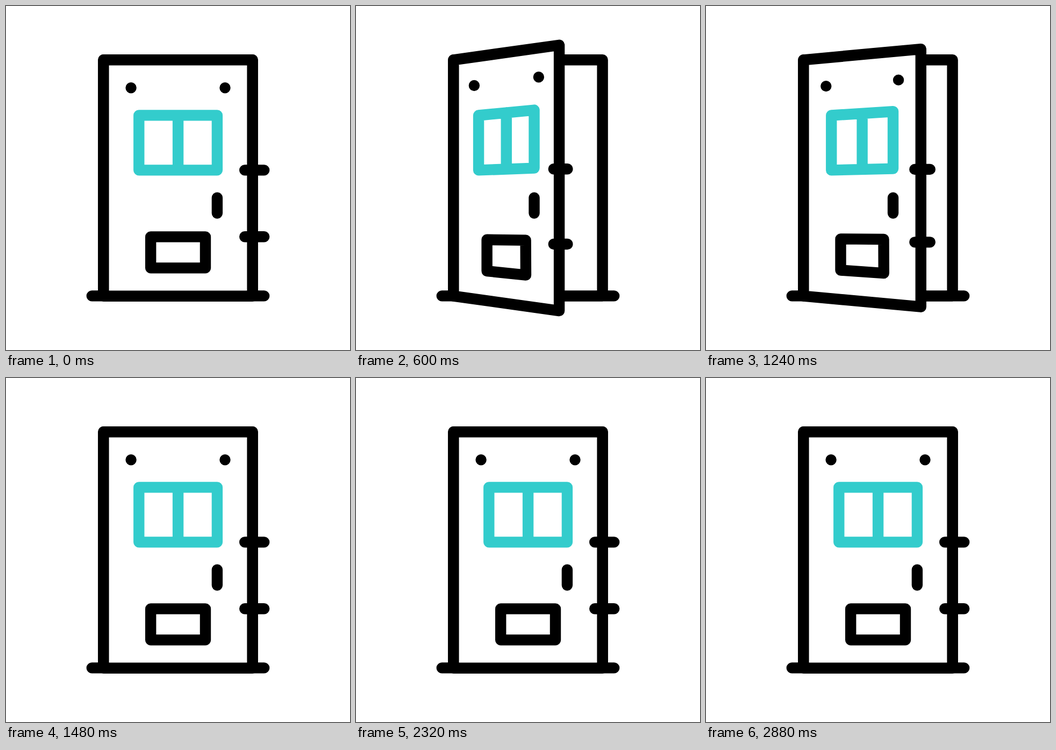
An HTML page that plays this animation: 640x640 px, repeating every 3 s.

```html
<!DOCTYPE html>
<html lang="en">
<head>
<meta charset="utf-8">
<title>Swinging door</title>
<style>
  html, body { margin: 0; width: 100%; height: 100%; overflow: hidden; background: #fff; }
  svg { display: block; width: 100%; height: 100%; }
  path { fill: none; stroke: #000; stroke-width: 20.4; stroke-linecap: round; stroke-linejoin: round; }
  .leaf { fill: #fff; }
  .glass { stroke: #33cccc; }
</style>
</head>
<body>
<svg viewBox="0 0 640 640">
  <path d="M181.4 100.3H458.6V539.6H181.4ZM159.8 539.4H480.2"/>

  <!-- d is the closed pose, data-open the open one -->
  <path class="leaf" d="M181.4 100.3L458.6 100.3L458.6 539.6L181.4 539.6Z"
    data-open="M181.4 100.3L366 68.6L366 571.2L181.4 539.6Z"/>
  <path d="M232.6 152.3L232.6 152.3M407.5 152.3L407.5 152.3"
    data-open="M218 147.3L218 147.3M329.7 129.2L329.7 129.2"/>
  <path class="glass" d="M247.3 203.4L392.9 203.4L392.9 305.4L247.3 305.4ZM320.1 203.4L320.1 305.4"
    data-open="M225.2 203.5L322.3 192.1L322.3 301L225.2 305.4ZM273.7 197.8L273.7 303.2"/>
  <path d="M392.9 356.6L392.9 385.5" data-open="M322.3 356.6L322.3 385.5"/>
  <path d="M269.2 429.4L371 429.4L371 487.4L269.2 487.4Z"
    data-open="M239.8 435.6L307.3 436.7L307.7 502.6L239.8 493.9Z"/>
  <path d="M444.2 305.4L480.2 305.4M444.2 429.3L480.2 429.3"
    data-open="M356.3 303L380.4 303M356.3 445.1L380.4 445.1"/>
</svg>
<script>
const LOOP = 3000, STEP = 40;
const OPEN_AT = 80, PEAK_AT = 850, SHUT_AT = 1480, PEAK = 1.03;
// rebounds: start, end, height
const REBOUNDS = [[SHUT_AT, 2320, 0.397], [2320, 2880, 0.085]];

const NUM = /-?\d+(\.\d+)?/g;
const parts = [...document.querySelectorAll('[data-open]')].map(el => ({
  el,
  shape: el.getAttribute('d'),
  open: el.dataset.open.match(NUM).map(Number)
}));

// cubic-bezier(.6, 0, .4, 1)
function easeInOut(x) {
  let lo = 0, hi = 1, s;
  for (let i = 0; i < 24; i++) {
    s = (lo + hi) / 2;
    const bx = 1.8 * s * (1 - s) ** 2 + 1.2 * s * s * (1 - s) + s ** 3;
    if (bx < x) lo = s; else hi = s;
  }
  return s * s * (3 - 2 * s);
}

function swing(t) {
  if (t <= OPEN_AT) return 0;
  if (t < PEAK_AT) return PEAK * easeInOut((t - OPEN_AT) / (PEAK_AT - OPEN_AT));
  if (t < SHUT_AT) return PEAK * (1 - ((t - PEAK_AT) / (SHUT_AT - PEAK_AT)) ** 2);
  for (const [from, to, height] of REBOUNDS) {
    if (t < to) {
      const u = (t - from) / (to - from);
      return height * 4 * u * (1 - u);
    }
  }
  return 0;
}

function draw(now) {
  const t = Math.floor((now + 4) / STEP) * STEP % LOOP;
  const p = swing(t);
  for (const { el, shape, open } of parts) {
    let i = 0;
    el.setAttribute('d', shape.replace(NUM, n => (+n + (open[i++] - n) * p).toFixed(3)));
  }
  requestAnimationFrame(draw);
}
requestAnimationFrame(draw);
</script>
</body>
</html>
```
